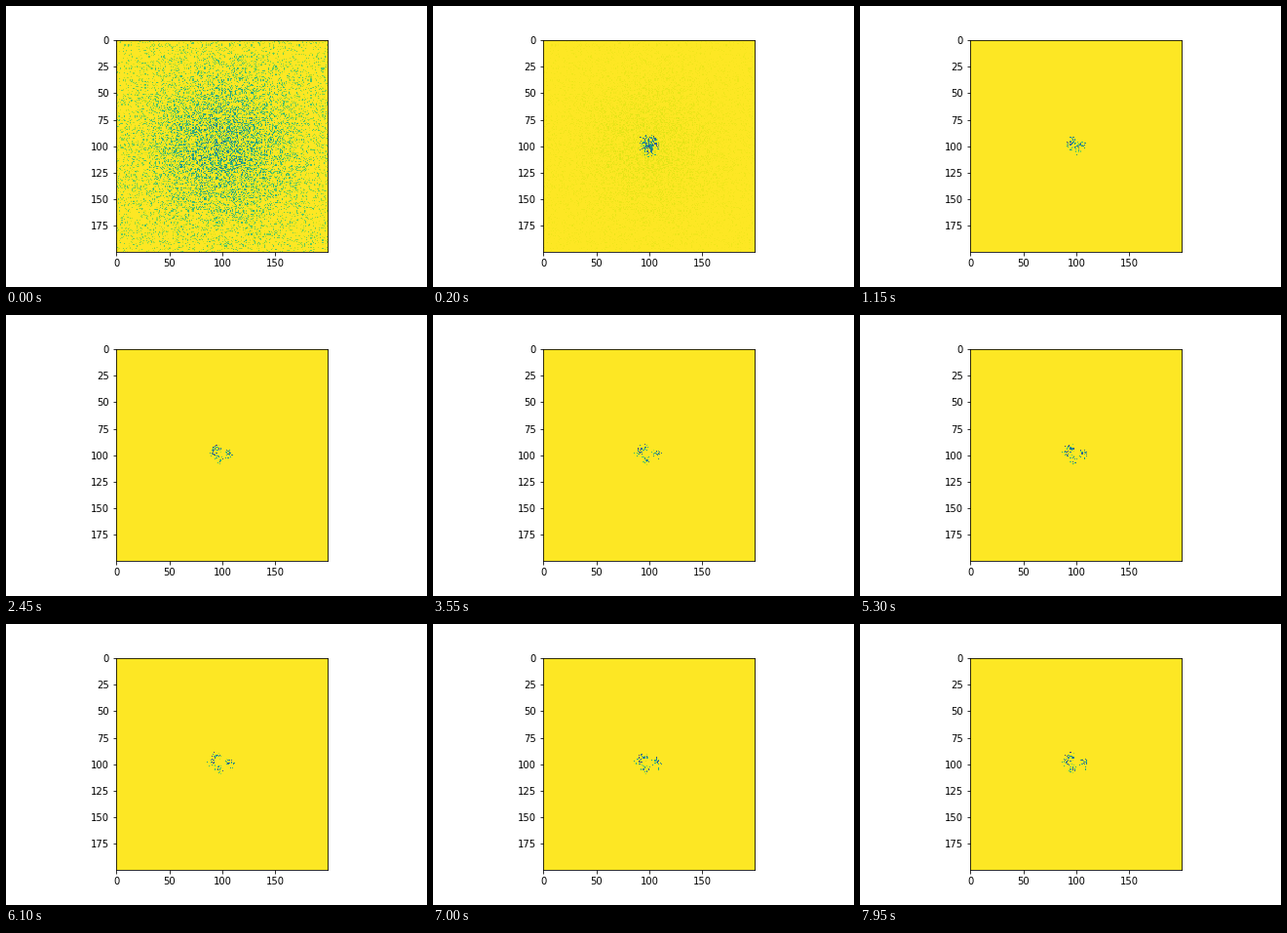
A matplotlib script that plays this animation: 432 by 288 pixels, repeating every 8 s.

```python
import numpy as np
import matplotlib.pyplot as plt
from matplotlib.animation import FuncAnimation

SIZE = 200
FRAMES = 160
CORE = 68      # walkers that last the whole loop
BRIEF = 130    # walkers that fade out early
CX, CY = 98.5, 99.5
CLUMPS = np.array([(-5, -6), (-2, 5), (8, -2), (-9, -1), (9, 4)])

rng = np.random.default_rng(7)

# Wide speckle cloud: density and depth peak in the middle.
yy, xx = np.mgrid[:SIZE, :SIZE]
glow = np.exp(-((xx - 100) ** 2 + (yy - 100) ** 2) / (2 * 46 ** 2))
speckled = rng.random((SIZE, SIZE)) < 0.14 + 0.48 * glow
depth = rng.uniform(0.02, 0.26 + 0.36 * glow)
cloud = np.where(speckled, depth, 0)

# Small cluster: walkers drift from a blob into loose clumps.
count = CORE + BRIEF
index = np.arange(count)
start = rng.normal(0, 1, (2, count)) * np.where(index < CORE, 5.5, 4.4)
start = np.clip(start, -10, 11)
clump = CLUMPS[rng.choice(len(CLUMPS), count, p=[.27, .25, .22, .16, .10])].T
goal = clump + np.clip(rng.normal(0, 2, (2, count)), -4, 4)
life = np.where(index < CORE, FRAMES + 1, rng.uniform(5, 24, count))
wobble = rng.uniform(0, 2 * np.pi, (2, count))
rate = rng.uniform(0.06, 0.16, (2, count))
tone = rng.uniform(0.15, 0.75, count)
tone_phase = rng.uniform(0, 2 * np.pi, count)


def field(k):
    """Cell values at step k, 1 being the empty background."""
    grid = 1 - cloud * np.exp(-0.6 * k)
    if k == 0:
        return grid
    mix = 1 - np.exp(-k / 22)
    pos = start * (1 - mix) + goal * mix + 0.9 * np.sin(rate * k + wobble)
    col = np.rint(CX + 1.5 * (1 - mix) + pos[0]).astype(int)
    row = np.rint(CY + pos[1]).astype(int)
    dark = np.clip(tone + 0.12 * np.sin(0.35 * k + tone_phase), 0.08, 0.9)
    alive = life > k
    np.minimum.at(grid, (row[alive], col[alive]), 1 - dark[alive])
    return grid


plt.rcParams.update({"font.family": "DejaVu Sans", "font.size": 10})
fig = plt.figure(figsize=(6, 4), dpi=72, facecolor="white")
ax = fig.add_axes([0.125, 0.125, 0.775, 0.755])
image = ax.imshow(field(0), cmap="viridis", vmin=0, vmax=1,
                  interpolation="nearest")
ax.set_xticks(range(0, SIZE, 50))
ax.set_yticks(range(0, SIZE, 25))


def update(k):
    image.set_data(field(k))
    return [image]


anim = FuncAnimation(fig, update, frames=FRAMES, interval=50,
                     repeat=True, repeat_delay=0)
plt.show()
```
